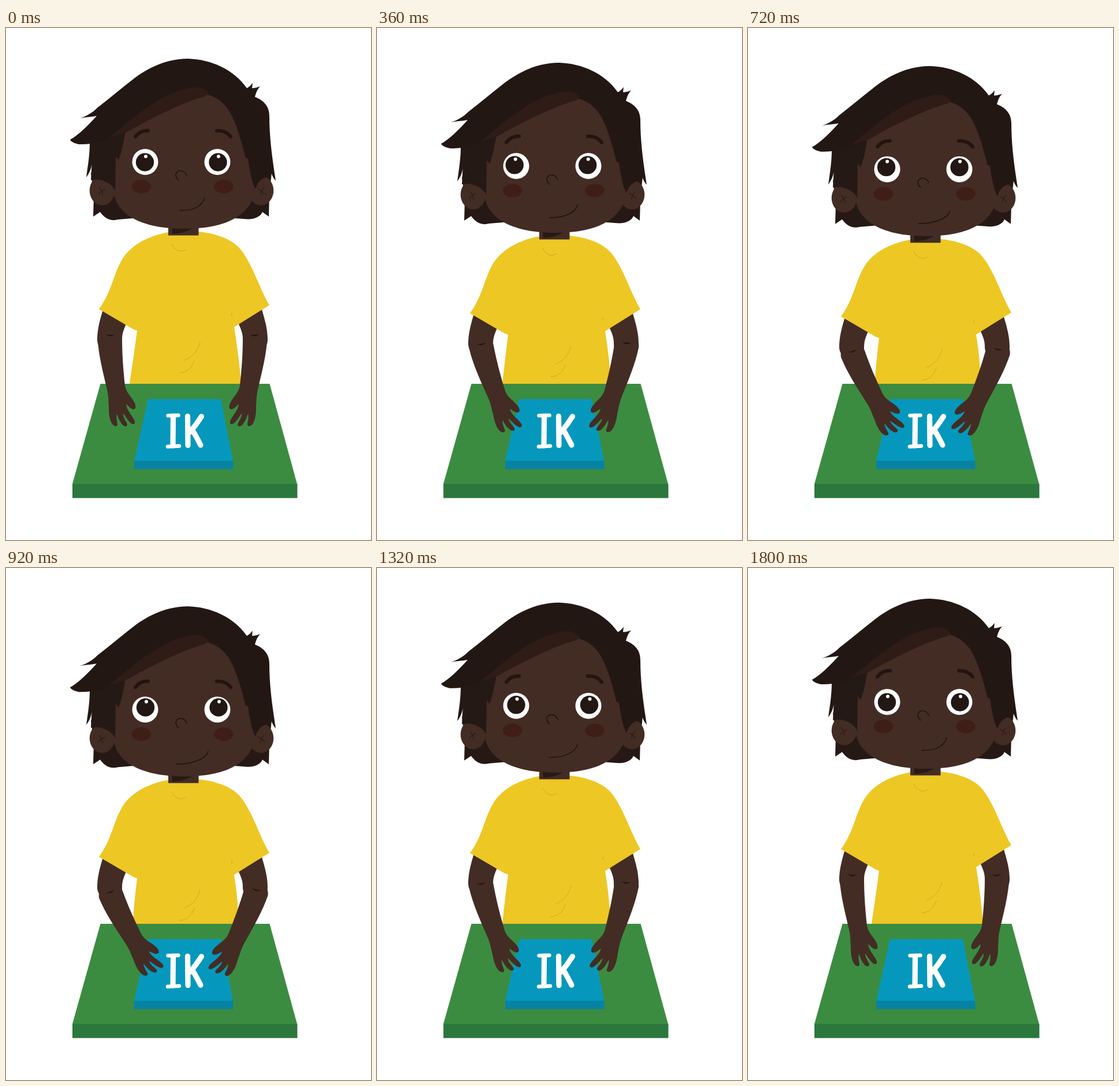
Write an HTML page that moves like this. It is 632 by 885 pixels and loops after 1.84 s.

```html
<!DOCTYPE html>
<html lang="nl">
<head>
<meta charset="utf-8">
<title>IK</title>
<style>
  html, body { margin: 0; width: 100%; height: 100%; overflow: hidden; background: #fff; }
  svg { display: block; width: 100%; height: 100%; }
  .skin { fill: #432c24; }
  .hair { fill: #231714; }
  .line { fill: none; stroke: #1f120f; stroke-width: 1.5; stroke-linecap: round; }
  .crease { fill: none; stroke: #2b1913; stroke-width: 1.1; stroke-linecap: round; }
  .brow { fill: none; stroke: #231411; stroke-width: 6; stroke-linecap: round; }
  .fold { fill: none; stroke: #a98c1c; stroke-width: 1; stroke-dasharray: 1.5 1.5; }
  .chalk { fill: none; stroke: #fff; stroke-width: 9.2; stroke-linecap: round; stroke-linejoin: round; }
</style>
</head>
<body>
<svg viewBox="0 0 632 885">
  <defs>
    <path id="upper" class="skin" d="M170 480C160 512 158 525 158 540A21.5 21.5 0 0 0 201 538C201 528 204 520 210 508L215 490Z"/>
    <g id="fore">
      <path class="skin" d="M158.5 535C160 512 201 512 201 536C201 565 203 590 206 618C208 630 216 636 221 645C226 653 225 659 221 659C216 659 212 653 208 650C209 662 221 672 223 680C224 686 219 686 215 682C210 677 206 670 203 666C202 673 209 681 210 685C210 690 204 689 201 685C196 679 194 672 192 667C190 674 193 682 193 686C191 690 186 688 183 683C178 674 178 662 178 654C177 645 178 638 175 625C168 595 160 565 158.5 535Z"/>
      <path fill="#1d100c" d="M173 529.5Q181 531.5 188 530Q181 535.5 173 529.5Z"/>
    </g>
    <g id="ear">
      <ellipse class="skin" cx="166.500" cy="281" rx="21.800" ry="25.500"/>
      <path class="crease" d="M161 276Q167 281 167 289M171 279Q164 282 160 288"/>
    </g>
  </defs>

  <g id="torso">
    <use href="#upper"/>
    <use href="#upper" transform="matrix(-1 0 0 1 611 0)"/>
    <path id="shirt" fill="#edc724"/>
    <path class="fold" d="M287 374Q297 391 311 383M336 543Q329 567 309 574M326 575Q319 595 301 596M391 493v6"/>
    <path class="skin" d="M281 335H333.500V358.500H281Z"/>
    <path fill="#281914" d="M287 345H325Q310 355 288 356Z"/>
  </g>

  <path fill="#3b8c41" d="M163.500 615H456.500L504 788H115Z"/>
  <path fill="#2c773c" d="M115 788H504.500V812.500H115Z"/>
  <path fill="#0598bc" d="M246 641.500H372L393 748H222Z"/>
  <path fill="#0782a3" d="M222 748H393.500V762.500H222Z"/>
  <g class="chalk" role="img">
    <title>IK</title>
    <path stroke-width="6.500" d="M280.500 670L298.500 669.500M280 723.500L300 722.500"/>
    <path d="M289.500 671L289 722M314.500 671L315 721.500M338.500 671.500C332 682 325 691 318 699M323 695Q331 709 337 721"/>
  </g>

  <use id="armL" href="#fore"/>
  <use id="armR" href="#fore"/>

  <g id="head">
    <path fill="#261814" d="M147 250L152 290L151 326L163 318C170 328 180 335 194 331L230 328H385L412 330C426 332 440 328 444 318L455 326L456 290L460 250Z"/>
    <use href="#ear"/>
    <use href="#ear" transform="matrix(-1 0 0 1 608 0)"/>
    <path class="skin" d="M186 280C189 325 240 347 307 347C376 347 424 328 433 276C430 170 385 105 330 105L180 180Z"/>
    <path fill="#241915" d="M145 198C145 222 141 242 139 258C144 251 147 245 148.500 236L147 263C165 259 183 268 189 281L190 222L195 228C201 212 203 200 207 178Z"/>
    <path class="hair" d="M111 193C124 186 142 169 157 152C146 154 137 154 128 156C140 152 150 146 158 138C180 121 200 104 222 87C250 66 282 53 315 53C355 54 395 72 417 104C421 102 424 99 427 95L426 104C431 104 436 102 440 101C435 106 433 112 431 119C446 125 456 135 456 152C456 190 461 225 467 264C463 260 461 255 459 250V258C447 255 436 264 432 278C426 268 424 255 421 240L419 226L414.500 224C409 200 403 180 394 158C384 135 370 120 345 114C290 128 240 160 207 180C180 194 150 202 126 201C118 199 113 197 111 193Z"/>
    <path fill="#2f1c17" d="M178 190C225 152 272 108 328 102.500C338 102 344 105 351 113L345 118C305 129 255 154 207 181Z"/>
    <g fill="#3f1e18">
      <ellipse cx="234.500" cy="274" rx="16.700" ry="11.700"/>
      <ellipse cx="377" cy="274" rx="16.700" ry="11.700"/>
    </g>
    <circle cx="241" cy="231.500" r="22.500" fill="#fff"/>
    <circle cx="366" cy="231.500" r="22.500" fill="#fff"/>
    <path class="line" d="M313 255C309 245 297 244 294 253C294 258 296 261 299 263"/>
    <g id="brows" class="brow">
      <path d="M224 188C229 181 236 177 246 177.500"/>
      <path d="M389 188C384 181 376 177 365 177.500"/>
    </g>
    <g id="pupils">
      <g class="hair"><circle cx="240.500" cy="232" r="15.700"/><circle cx="367" cy="232" r="15.700"/></g>
      <g fill="#fff"><circle cx="242" cy="222" r="3"/><circle cx="368" cy="222" r="3"/></g>
    </g>
    <path id="mouth" class="line"/>
  </g>
</svg>
<script>
  const LOOP = 1840, STEP = 40;
  const DOWN_END = 920, UP_START = 1040, UP_END = 1800;
  const $ = id => document.getElementById(id);
  const set = (id, name, value) => $(id).setAttribute(name, value);
  const shift = (id, x, y) => set(id, 'transform', `translate(${x} ${y})`);

  // Cubic ease with a quick start and a long settle
  function ease(x) {
    let lo = 0, hi = 1;
    for (let i = 0; i < 24; i++) {
      const s = (lo + hi) / 2, r = 1 - s;
      const at = 3 * r * r * s * 0.33 + 3 * r * s * s * 0.33 + s * s * s;
      if (at < x) lo = s; else hi = s;
    }
    return lo * lo * (3 - 2 * lo);
  }

  function lean(t) {
    if (t < DOWN_END) return ease(t / DOWN_END);
    if (t < UP_START) return 1;
    if (t < UP_END) return 1 - ease((t - UP_START) / (UP_END - UP_START));
    return 0;
  }

  // The eyes drift sideways while the body goes down
  const glance = t => t < DOWN_END ? Math.sin(Math.PI * t / DOWN_END) : 0;

  function pose(t) {
    const k = lean(t);
    shift('torso', 0, 13.2 * k);
    shift('head', 0, 13.2 * k);
    shift('brows', 0, 5 * k);
    shift('pupils', k - 3 * glance(t), -4.2 * k);
    set('shirt', 'd', `M281 353C244 360 216 376 201 400C185 428 183 456 161 486L221 521L227 523
      Q222 562 ${214 + 4.5 * k} 614V640H${407 - 4 * k}V614Q403 565 395 517L456 479
      C438 449 425 402 402 378C384 361 355 354 333 352Z`);
    const x = 6 * k, y = 10.5 * k;
    set('mouth', 'd', `M${301 - x} ${315 + y}C${324 - x} ${316.5 + y} ${341 + x} ${307 + y} ${344 + x} ${293 + y}`);
    set('armL', 'transform', `translate(${5 * k} ${28 * k}) rotate(${-20 * k} 181 545)`);
    set('armR', 'transform', `translate(${-k} ${25 * k}) rotate(${16 * k} 431 545) matrix(-1 0 0 1 611 0)`);
  }

  const start = performance.now();
  function draw(now) {
    const t = Math.max(0, now - start) % LOOP;
    pose(Math.floor(t / STEP) * STEP);
    requestAnimationFrame(draw);
  }
  pose(0);
  requestAnimationFrame(draw);
</script>
</body>
</html>
```
